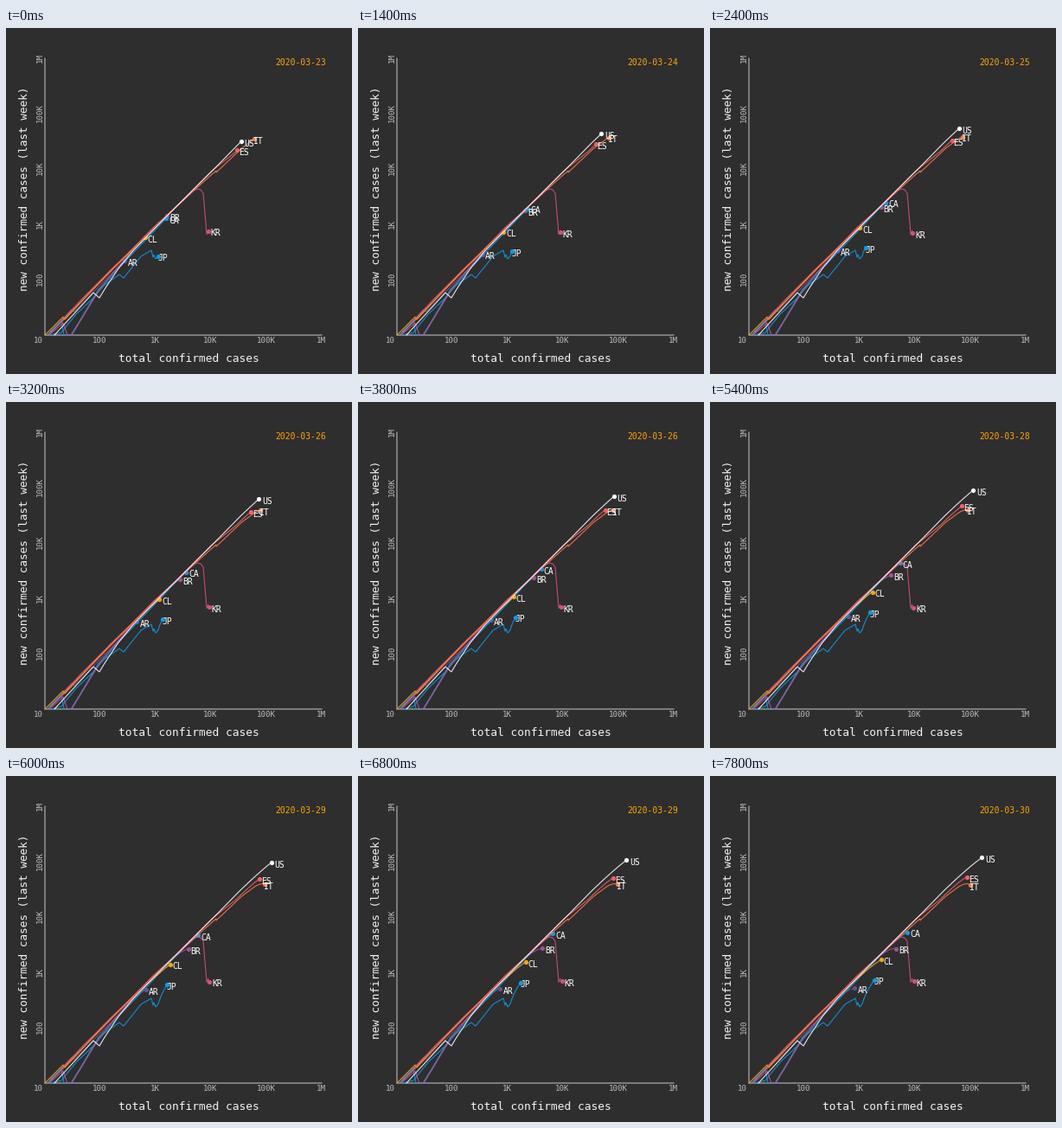
Animation, 400 px wide and 400 px high, one loop 8000 ms. Source, as a matplotlib script:

```python
import math

import matplotlib.pyplot as plt
import numpy as np
from matplotlib.animation import FuncAnimation

DPI = 100
FRAMES = 40
STEP_MS = 200
START_DAY = 22.16
FIRST_DAY, LAST_DAY = 22, 30
LEFT, BOTTOM, DECADE = 45, 355, 64

plt.rcParams["font.family"] = "DejaVu Sans Mono"


def pt(px):
    return px * 72 / DPI


fig = plt.figure(figsize=(4, 4), dpi=DPI, facecolor="#2e2e2e")
ax = fig.add_axes([0, 0, 1, 1])
ax.set_xlim(0, 400)
ax.set_ylim(400, 0)
ax.axis("off")


def write(x, y, text, size, color, **kw):
    return ax.text(x, y, text, fontsize=pt(size), color=color, zorder=50, **kw)


def glide(u, start, middle, end):
    """Points on the parabola through start (u=0), middle (0.5), end (1)."""
    u = np.reshape(u, (-1, 1))
    start, middle, end = map(np.array, (start, middle, end))
    return ((1 - u) * (1 - 2 * u) * start + 4 * u * (1 - u) * middle
            + u * (2 * u - 1) * end)


class Track:
    """Growing line: a fixed trail, then a head gliding through three points."""

    count = 0

    def __init__(self, name, color, dx, trail, head):
        Track.count += 1
        z = 2 + Track.count
        self.trail, self.head, self.dx = trail, head, dx
        self.line, = ax.plot([], [], color=color, lw=pt(1.1), alpha=0.88,
                             zorder=z, solid_joinstyle="round")
        self.dot, = ax.plot([], [], "o", color=color, ms=pt(5.2), mew=0,
                            zorder=z)
        self.label = write(0, 0, name, 9.8, "white")

    def move(self, day):
        u = (day - FIRST_DAY) / (LAST_DAY - FIRST_DAY)
        path = np.vstack([self.trail, glide(np.linspace(0, u, 24), *self.head)])
        x, y = path[-1]
        self.line.set_data(path[:, 0], path[:, 1])
        self.dot.set_data([x], [y])
        self.label.set_position((x + self.dx, y + 5.8))


BLUE = "#0a9dec"

# Later tracks cover earlier ones.
tracks = [
    Track("AR", "#665191", 3.4,
          [(50, 352), (76, 325), (79, 328), (108, 298)],
          [(136.2, 269.8), (153.8, 252.1), (167.5, 245.2)]),
    Track("BR", "#a05195", 3,
          [(52, 350), (82, 321), (120, 282), (160, 243)],
          [(185.1, 218), (203.4, 203.1), (215.3, 199.6)]),
    Track("CA", BLUE, 3,
          [(52, 355), (64, 352), (81, 331), (102, 311), (127, 281)],
          [(183.7, 221.6), (211.8, 193.1), (228.6, 180.6)]),
    Track("CL", "#ffa600", 2.6,
          [(45, 355), (66, 334), (68, 337), (121, 280)],
          [(160.3, 243.2), (180.4, 225.2), (197.9, 212.2)]),
    Track("ES", "#f95d6a", 1.7,
          [(52, 352), (87, 314), (123, 278), (196, 207), (237, 166)],
          [(266.4, 142.4), (285.8, 124.6), (297.4, 116.7)]),
    Track("IT", "#ff7c43", -1,
          [(48, 355), (64, 340), (170, 231), (237, 170), (243, 165),
           (243, 167), (272, 139.5)],
          [(286.4, 128.7), (295, 124.8), (301.5, 126)]),
    Track("JP", BLUE, -0.4,
          [(48, 355), (64, 339), (67, 355), (75, 355), (85, 339), (107, 302),
           (131, 285), (136, 289), (156, 264), (168, 257), (170, 265),
           (171, 262), (173, 267)],
          [(175.6, 264.2), (182.1, 248.4), (190.3, 235.4)]),
    Track("KR", "#d45087", 2.8,
          [(50, 355), (66, 341), (71, 355), (76, 355), (110, 299),
           (159, 242.5), (217, 188), (221, 186), (225, 187), (228, 191),
           (231, 226), (232, 238.5)],
          [(233.6, 234.4), (234.8, 237.4), (236, 236.9)]),
    Track("US", "#ffffff", 3.7,
          [(56, 355), (90, 318), (101, 306), (108, 312), (114, 302),
           (130, 278), (147, 257.5), (180, 223.5), (246, 157.5)],
          [(270.4, 132.6), (296.1, 108.9), (314.3, 94.4)]),
]

# Axes, ticks and titles
ax.plot([LEFT, LEFT, LEFT + 5 * DECADE], [BOTTOM - 5 * DECADE, BOTTOM, BOTTOM],
        color="#c8c8c8", lw=pt(1), zorder=1, snap=False,
        solid_joinstyle="miter")
mid = dict(ha="center", va="center")
write(37, 361, "10", 9.1, "#bdbdbd", **mid)
for i, text in enumerate(["100", "1K", "10K", "100K", "1M"], 1):
    write(LEFT - 0.5 + DECADE * i, 361, text, 9.1, "#bdbdbd", **mid)
    write(39, BOTTOM - 1 - DECADE * i, text, 9.1, "#bdbdbd", rotation=90, **mid)
write(211.7, 382, "total confirmed cases", 12.9, "#f2f2f2", **mid)
write(21.5, 186.3, "new confirmed cases (last week)", 12.8, "#f2f2f2",
      rotation=90, **mid)
date = write(311.6, 43, "", 9.8, "#ffa600")


def draw(frame):
    day = START_DAY + frame * STEP_MS / 1000
    for track in tracks:
        track.move(day)
    date.set_text(f"2020-03-{math.ceil(day):02d}")
    return []


anim = FuncAnimation(fig, draw, frames=FRAMES, interval=STEP_MS,
                     repeat=True, repeat_delay=0)
plt.show()
```
